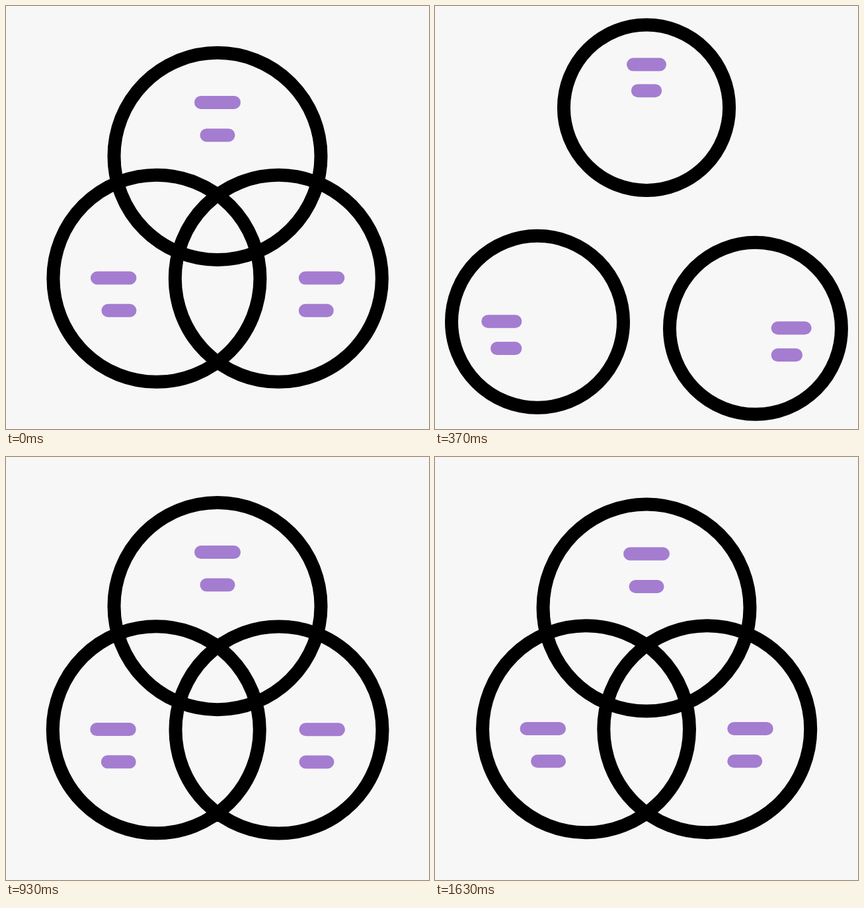
An HTML page for the animation above (1670 ms loop, 640x640 px).

```html
<!DOCTYPE html>
<html lang="en">
<head>
<meta charset="utf-8">
<title>Venn diagram</title>
<style>
  html, body { margin: 0; width: 100%; height: 100%; overflow: hidden; background: #f7f7f7; }
  svg { display: block; width: 100%; height: 100%; }
  path { fill: none; stroke-width: 20; }
  #stripes, #bars { stroke: #a47dd1; }
  #bars { stroke-linecap: round; }
  #rings { stroke: #000; }
</style>
</head>
<body>
<svg viewBox="0 0 640 640">
  <path id="stripes"/>
  <path id="bars"/>
  <path id="rings"/>
</svg>
<script>
const LOOP = 1670, FRAME = 1000 / 30, LAST = 49, RADIUS = 156.5;

// Centre, outward travel, shrink amount, frame at which the return ends,
// and bars as [x1, x2, y] relative to the centre.
const sets = [
  { x: 320, y: 228, dx: 0, dy: -80, shrink: 0.214, home: 29.75,
    bars: [[-25, 25, -81.5], [-16.5, 16.5, -32]] },
  { x: 228.5, y: 411.75, dx: -79.2, dy: 71.2, shrink: 0.181, home: 29.2,
    bars: [[-90, -40.5, -0.75], [-73.5, -40.5, 48.5]] },
  { x: 411.75, y: 411.75, dx: 78.9, dy: 82, shrink: 0.181, home: 29.2,
    bars: [[40.5, 90, -0.75], [40.5, 73.5, 48.5]] }
];

// Diagonal stripes: lower x, upper x, and the constant x + y.
const stripes = [
  [202.5, 272, 534], [252, 354, 619.5], [259, 446, 705], [286, 385, 790.5]
];

// Smoothstep; a skew below 1 gives a quicker start and a longer tail.
const ease = (frame, from, to, skew = 1) => {
  const p = Math.min(1, Math.max(0, (frame - from) / (to - from))) ** skew;
  return p * p * (3 - 2 * p);
};
const mix = (a, b, p) => a + (b - a) * p;
const line = (x1, y1, x2, y2) => `M${x1} ${y1}L${x2} ${y2}`;
const circle = (x, y, r) =>
  `M${x - r} ${y}a${r} ${r} 0 1 1 ${2 * r} 0a${r} ${r} 0 1 1 ${-2 * r} 0z`;
const setPath = (id, d) => document.getElementById(id).setAttribute("d", d);

function render(time) {
  const t = time % LOOP;
  const frame = Math.min(LAST, Math.floor((t + 3.4) / FRAME));
  const out = ease(frame, -0.7, 13.3);
  const size = ease(frame, 0, 13) - ease(frame, 14, 27.2);
  let rings = "", bars = "", hatch = "";

  for (const s of sets) {
    const travel = out - ease(frame, 14.55, s.home, 0.9);
    const x = s.x + s.dx * travel, y = s.y + s.dy * travel;
    const scale = 1 - s.shrink * size;
    rings += circle(x, y, RADIUS * scale);
    for (const [x1, x2, by] of s.bars)
      bars += line(x + x1 * scale, y + by * scale, x + x2 * scale, y + by * scale);
  }

  const head = ease(frame, 29, 40), tail = ease(frame, 40.5, 49);
  if (head > tail) {
    for (const [low, high, sum] of stripes) {
      const a = mix(low, high, tail), b = mix(low, high, head);
      hatch += line(a, sum - a, b, sum - b);
    }
  }

  setPath("rings", rings);
  setPath("bars", bars);
  setPath("stripes", hatch);
}

const start = performance.now();
function tick() {
  render(performance.now() - start);
  requestAnimationFrame(tick);
}
tick();
</script>
</body>
</html>
```
